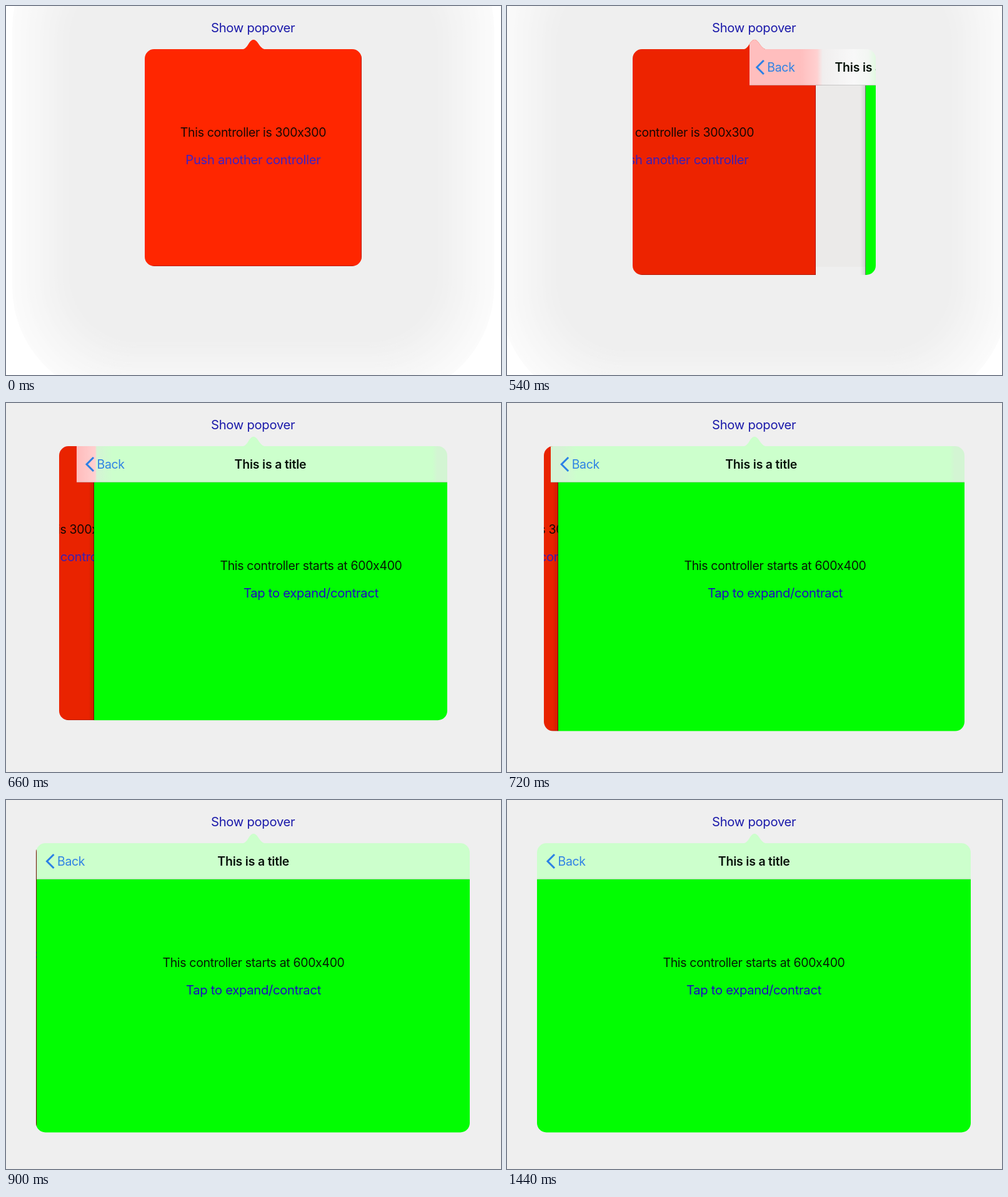
These frames come from a looping animation (792x590 px, 1.5 s). An HTML page with a canvas:

```html
<!DOCTYPE html>
<html lang="en">
<head>
<meta charset="utf-8">
<title>Popover push</title>
<style>
  html, body { margin: 0; width: 100%; height: 100%; overflow: hidden; background: #fff; }
  canvas { display: block; }
</style>
</head>
<body>
<canvas id="stage" width="792" height="590"></canvas>
<script>
const ctx = document.getElementById('stage').getContext('2d');
const LOOP = 1500, STEP = 60;
const TOP = 69, BAR_BOTTOM = 127, CENTER = 395.2;
const SMALL = 347, LARGE = 694;

// [time in ms, progress]
const RESIZE = [[480, 0], [540, .121], [600, .478], [660, .79], [720, .94], [780, .985], [840, .997], [900, 1]];
const PUSH = [[480, 0], [540, .462], [600, .815], [660, .92], [720, .967], [780, .988], [840, .995], [900, .9985], [960, .9995], [1020, 1]];

const LABEL = { font: '19.5px Inter, sans-serif', spacing: '-0.34px' };
const TITLE = { font: '600 19.5px Inter, sans-serif', spacing: '-0.2px' };
const BUTTON = { font: '20.2px Inter, sans-serif', spacing: '-0.28px' };

const mix = (a, b, k) => a + (b - a) * k;

function track(keys, t) {
  if (t <= keys[0][0]) return keys[0][1];
  for (let i = 1; i < keys.length; i++) {
    const [t0, v0] = keys[i - 1], [t1, v1] = keys[i];
    if (t <= t1) return mix(v0, v1, (t - t0) / (t1 - t0));
  }
  return keys[keys.length - 1][1];
}

function fill(color, x, y, w, h) {
  ctx.fillStyle = color;
  ctx.fillRect(x, y, w, h);
}

function text(str, x, y, style, color, align = 'center') {
  ctx.font = style.font;
  ctx.letterSpacing = style.spacing;
  ctx.textAlign = align;
  ctx.fillStyle = color;
  ctx.fillText(str, x, y);
}

function drawBackdrop(box) {
  fill('#fff', 0, 0, 792, 590);
  const layers = 20;
  for (let i = 0; i <= layers; i++) {
    const k = i / layers, margin = mix(212, 122, k), level = mix(251, 239, k);
    ctx.fillStyle = `rgb(${level}, ${level}, ${level})`;
    ctx.beginPath();
    ctx.roundRect(box.left - margin, TOP - margin, box.width + 2 * margin,
      box.bottom - TOP + 2 * margin, mix(180, 110, k));
    ctx.fill();
  }
}

function popoverPath(box) {
  const path = new Path2D();
  path.roundRect(box.left, TOP, box.width, box.bottom - TOP, 15);
  path.moveTo(377, TOP + .5);
  path.bezierCurveTo(385, TOP, 387, 61, 391, 56.5);
  path.quadraticCurveTo(396, 51, 401, 56.5);
  path.bezierCurveTo(405, 61, 408, TOP, 416, TOP + .5);
  path.closePath();
  return path;
}

// Everything behind the incoming panel, cut off at its left edge.
function drawRedPanel(box, push, greenX) {
  const x = box.left - Math.round(.3 * LARGE * push), right = x + box.width;
  const height = box.bottom - TOP;
  ctx.save();
  ctx.beginPath();
  ctx.rect(0, 0, greenX, 590);
  ctx.clip();
  fill('#ebeae9', right, 50, 792, 367);
  fill('#efefef', right, 417, 792, 173);
  fill('#ff2600', x, 50, box.width, box.bottom - 50);
  const textX = x + SMALL / 2;
  text('This controller is 300x300', textX, 209, LABEL, '#1a0804');
  text('Push another controller', textX, 253, BUTTON, '#3f22c4');
  fill(`rgba(0, 0, 0, ${.06 * Math.min(1, push * 2) + .03 * push})`, x, 50, box.width, box.bottom - 50);
  fill('rgba(90, 0, 0, .4)', right - 1, TOP, 1, height);
  fill('rgba(90, 0, 0, .4)', x, box.bottom - 1, box.width, 1);

  if (push > 0) {
    const shadow = ctx.createLinearGradient(greenX - 9, 0, greenX, 0);
    shadow.addColorStop(0, 'rgba(0, 0, 0, 0)');
    shadow.addColorStop(1, 'rgba(0, 0, 0, .12)');
    fill(shadow, greenX - 9, TOP, 9, height);
    fill('rgba(0, 0, 0, .45)', greenX - 1, TOP, 1, height);
  }
  ctx.restore();
  return right;
}

function drawGreenPanel(box, x) {
  fill('#02fd02', x, BAR_BOTTOM, LARGE, box.bottom);
  text('This controller starts at 600x400', x + SMALL, 267, LABEL, '#061a06');
  text('Tap to expand/contract', x + SMALL, 311, BUTTON, '#1d0cc0');
}

function barGradient(box, barX, redRight, greenX) {
  const gradient = ctx.createLinearGradient(0, 0, 792, 0);
  const stop = (x, color) => gradient.addColorStop(Math.max(0, Math.min(1, x / 792)), color);
  const edge = Math.min(redRight, greenX), right = box.left + box.width;
  if (edge - barX > 15) {
    stop(edge - 25, '#ffbebe');
    stop(edge + 2, '#ffd0d0');
  }
  if (greenX - edge > 30) {
    stop(edge + 11, '#f0eeee');
    stop(greenX - 20, '#f8f8f8');
  }
  if (greenX > box.left + 5) stop(greenX + 4, greenX > 500 ? '#f3f6f3' : '#d5f3d5');
  stop(greenX + 30, '#ccffcc');
  if (box.width < LARGE - 3 && greenX + 60 < right) {
    stop(right - 24, '#ccffcc');
    stop(right - 16, '#d3f5d3');
  }
  return gradient;
}

function drawBar(box, push, redRight, greenX) {
  const shift = SMALL * (1 - push), x = box.left + Math.round(shift);
  fill(barGradient(box, x, redRight, greenX), x, 50, box.width, BAR_BOTTOM - 50);
  fill('rgba(0, 0, 0, .18)', x, BAR_BOTTOM - 1, box.width, 1);

  const backX = box.left + 15 + 338 * (1 - push);
  ctx.strokeStyle = '#2b80e6';
  ctx.lineWidth = 3;
  ctx.beginPath();
  ctx.moveTo(backX + 13, 87);
  ctx.lineTo(backX + 2, 98);
  ctx.lineTo(backX + 13, 109);
  ctx.stroke();
  text('Back', backX + 18.5, 105, LABEL, '#2f82e4', 'left');
  text('This is a title', CENTER + shift, 105, TITLE, '#07120a');
}

function drawTouch(alpha) {
  ctx.globalAlpha = alpha;
  ctx.beginPath();
  ctx.arc(380.5, 249, 24, 0, 2 * Math.PI);
  ctx.fillStyle = 'rgba(192, 187, 197, .75)';
  ctx.fill();
  ctx.strokeStyle = 'rgba(130, 60, 50, .4)';
  ctx.lineWidth = 1;
  ctx.stroke();
  ctx.globalAlpha = 1;
}

function draw(t) {
  const size = track(RESIZE, t), push = track(PUSH, t);
  const width = Math.round(mix(SMALL, LARGE, size));
  const box = { left: Math.round(CENTER - width / 2), width, bottom: mix(416, 531.5, size) };
  const greenX = box.left + Math.round(LARGE * (1 - push));

  drawBackdrop(box);
  text('Show popover', CENTER, 42, BUTTON, '#1b1aaa');

  ctx.save();
  ctx.clip(popoverPath(box));
  const redRight = drawRedPanel(box, push, greenX);
  if (push > 0) {
    drawGreenPanel(box, greenX);
    drawBar(box, push, redRight, greenX);
  }
  ctx.restore();

  if (t >= 420 && t < 540) drawTouch(t < 480 ? 1 : .6);
}

const start = performance.now();
function tick() {
  const t = (performance.now() - start) % LOOP;
  draw(Math.floor(t / STEP) * STEP);
  requestAnimationFrame(tick);
}
tick();
</script>
</body>
</html>
```
